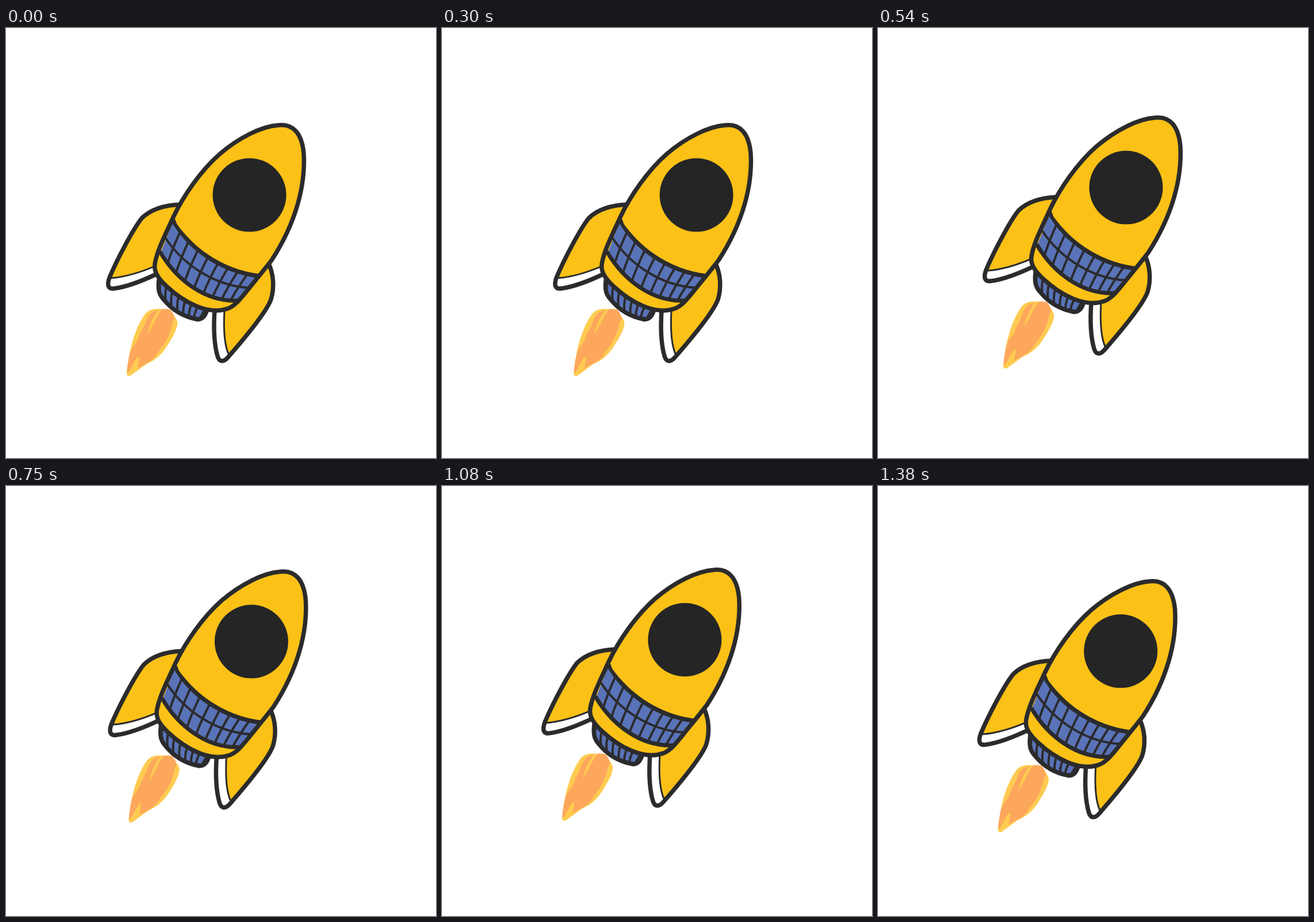
Recreate the animation shown at these times as an HTML page with a canvas. Size 748x748 px, loop 1.41 s.

```html
<!DOCTYPE html>
<html lang="en">
<head>
<meta charset="utf-8">
<title>Rocket</title>
<style>
  html, body { margin: 0; width: 100%; height: 100%; overflow: hidden; background: #fff; }
  canvas { display: block; }
</style>
</head>
<body>
<canvas id="stage" width="748" height="748"></canvas>
<script>
const ctx = document.getElementById('stage').getContext('2d');
const LOOP = 1410, STEP = 30;
const INK = '#2b2b2d', GOLD = '#fbc116', BLUE = '#5973b8', WHITE = '#fff';
const ORANGE = '#fda75d', AMBER = '#fecb50';
const OUTLINE = 7.5;

// Drift waypoints: time in ms, x, y
const drift = [
  [0, 0, 0], [330, 21, 0], [660, 0.5, -20.4],
  [985, 11, -18.8], [1157, -11, -26.6], [LOOP, 0, 0]
];

const shapes = {
  flame: 'M243 496C250 489 260 488 270 489C284 487 291 496 298 510C300 522 288 541 281 552C270 570 257 579 245 584L219 603C214 607 209 606 210 598C213 586 213 574 216 561C221 538 230 513 243 496Z',
  flameCore: 'M252 496C262 489 278 487 286 490C291 496 293 501 293 506C289 512 289 520 285 530C279 547 268 558 260 571C250 582 240 585 229 592C229 586 232 580 231 571C222 578 220 590 213 599C209 599 211 591 212 583C214 570 216 561 222 553C230 546 231 533 238 523C244 511 244 504 252 496Z',
  flameStreak: 'M265 490C258 500 249 515 246 532C252 525 257 513 262 504C265 498 268 494 272 489Z',
  leftFin: 'M304 307C278 308 252 315 236 331C221 350 194 401 180 434C175 448 178 455 189 453C211 450 237 440 264 427Z',
  leftTip: 'M183 435C208 433 237 424 264 412L264 427C237 440 211 450 189 453C178 455 178 445 183 435Z',
  leftSeam: 'M183 435C208 433 237 424 262 413',
  rightFin: 'M456 408C466 428 467 452 461 472C454 492 420 534 386 573C378 582 371 581 368 571C361 547 361 519 363 490Z',
  rightTip: 'M363 490L380 490C378 525 380 553 388 570C378 582 371 581 368 571C361 547 361 519 363 490Z',
  rightSeam: 'M380 490C378 525 380 553 388 569',
  nozzle: 'M266 438C264 455 266 463 274 472C290 492 312 503 333 507C343 507 347 499 350 490Z',
  body: 'M474 169C500 166 515 184 518 219C521 273 505 338 462 404C449 421 433 440 421 455C408 471 399 483 386 488C352 500 310 478 279 449C263 434 257 423 259 410C263 386 278 358 291 329C309 291 339 248 372 219C405 191 444 171 474 169Z',
  hull: 'M474 173C499 170 511 187 514 220C517 272 501 336 459 402C447 420 441 428 431 426C382 418 327 383 298 342C294 335 295 330 297 325C314 290 342 249 374 221C407 194 446 175 474 173Z'
};
for (const name in shapes) shapes[name] = new Path2D(shapes[name]);

// Arcs that bound the panelled areas, as cubic control points
const bandTop = [[291, 335], [318, 383], [373, 422], [437, 431]];
const bandMid = [[278, 366], [308, 411], [362, 449], [424, 452]];
const bandBase = [[269, 391], [297, 438], [347, 478], [406, 474]];
const nozzleTop = [[270, 440], [285, 460], [312, 480], [345, 488]];
const nozzleBase = [[269, 462], [284, 486], [311, 500], [336, 503]];

function fill(path, color) {
  ctx.fillStyle = color;
  ctx.fill(path);
}

function stroke(path, width) {
  ctx.strokeStyle = INK;
  ctx.lineWidth = width;
  ctx.stroke(path);
}

function arcPoint(p, t) {
  const u = 1 - t;
  return [0, 1].map(k =>
    u * u * u * p[0][k] + 3 * u * u * t * p[1][k] + 3 * u * t * t * p[2][k] + t * t * t * p[3][k]);
}

function arcPath(p) {
  const path = new Path2D();
  path.moveTo(...p[0]);
  path.bezierCurveTo(...p[1], ...p[2], ...p[3]);
  return path;
}

function panels(top, base, count, width) {
  const area = arcPath(top);
  area.lineTo(...base[3]);
  area.bezierCurveTo(...base[2], ...base[1], ...base[0]);
  area.closePath();
  fill(area, BLUE);
  for (let i = 1; i < count; i++) {
    // Spaces the ribs evenly across the width of the arc
    const t = i / count + 0.065 * Math.sin(Math.PI * i / count);
    const [x0, y0] = arcPoint(top, t);
    const [x1, y1] = arcPoint(base, t);
    const rib = new Path2D();
    rib.moveTo(x0, y0);
    rib.quadraticCurveTo((x0 + x1) / 2 - 2, (y0 + y1) / 2, x1, y1);
    stroke(rib, width);
  }
}

function drawFlame() {
  fill(shapes.flame, AMBER);
  fill(shapes.flameCore, ORANGE);
  fill(shapes.flameStreak, AMBER);
}

function drawFin(side) {
  fill(shapes[side + 'Fin'], GOLD);
  fill(shapes[side + 'Tip'], WHITE);
  stroke(shapes[side + 'Seam'], 3);
  stroke(shapes[side + 'Fin'], OUTLINE);
}

function drawNozzle() {
  fill(shapes.nozzle, INK);
  panels(nozzleTop, nozzleBase, 7, 4);
  stroke(shapes.nozzle, OUTLINE);
}

function drawBody() {
  fill(shapes.body, GOLD);
  ctx.save();
  ctx.clip(shapes.body);
  panels(bandTop, bandBase, 9, 4);
  stroke(arcPath(bandMid), 4);
  stroke(arcPath(bandTop), OUTLINE);
  stroke(arcPath(bandBase), 7);
  ctx.restore();
  fill(shapes.hull, GOLD);
  stroke(shapes.body, OUTLINE);
}

function drawBadge() {
  ctx.fillStyle = '#252526';
  ctx.beginPath();
  ctx.arc(423.5, 290.5, 64, 0, Math.PI * 2);
  ctx.fill();
}

function offsetAt(time) {
  const i = drift.findIndex(p => p[0] > time);
  const [t0, x0, y0] = drift[i - 1];
  const [t1, x1, y1] = drift[i];
  const k = (time - t0) / (t1 - t0);
  return [x0 + (x1 - x0) * k, y0 + (y1 - y0) * k];
}

function render(now) {
  const time = Math.floor((now % LOOP) / STEP) * STEP;
  ctx.fillStyle = WHITE;
  ctx.fillRect(0, 0, 748, 748);
  ctx.save();
  ctx.translate(...offsetAt(time));
  ctx.lineJoin = ctx.lineCap = 'round';
  drawFlame();
  drawFin('left');
  drawFin('right');
  drawNozzle();
  drawBody();
  drawBadge();
  ctx.restore();
}

let start;
function tick(now) {
  start ??= now;
  render(now - start);
  requestAnimationFrame(tick);
}
render(0);
requestAnimationFrame(tick);
</script>
</body>
</html>
```
